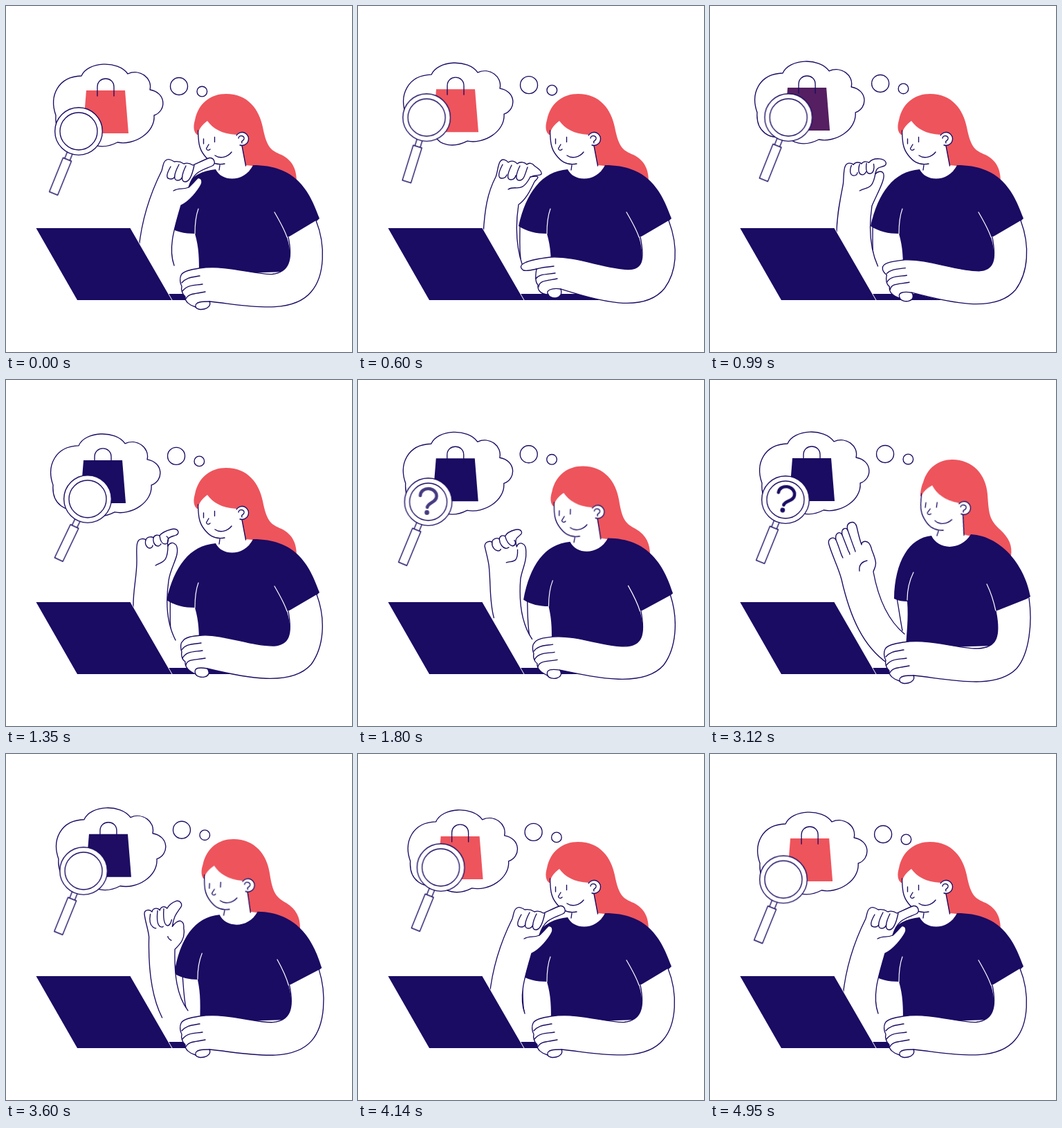
Write an HTML page without scripts that moves like this. It is 500x500 px and loops after 4980 ms.

```html
<!DOCTYPE html>
<html lang="en">
<head>
<meta charset="utf-8">
<title>Thinking about shopping</title>
<style>
:root { --navy: #1a0b63; --red: #ee545c; --loop: 4980ms; }
html, body { margin: 0; width: 100%; height: 100%; overflow: hidden; background: #fff; }
svg { display: block; width: 100vw; height: 100vh; }
.ink { fill: none; stroke: var(--navy); stroke-width: 1.35; stroke-linecap: round; stroke-linejoin: round; }
.skin { fill: #fff; }
.navy { fill: var(--navy); }
.red { fill: var(--red); }
.crease { fill: none; stroke: #fff; stroke-width: 1.2; stroke-linecap: round; }

.lens, .grip, .bag, .mark, .head, .hair, .shirt, .crease, .upper, .reach, .folds, .rest, .knuckles {
  animation: var(--loop) ease-in-out infinite;
}

/* thought cloud */
.lens { animation-name: lens; animation-timing-function: linear; }
@keyframes lens {
  0%, 100% { transform: translate(105px, 181px); }
  6% { transform: translate(101px, 171px); }
  12% { transform: translate(102px, 163px); }
  17% { transform: translate(112px, 161px); }
  22% { transform: translate(121px, 168px); }
  27.1% { transform: translate(122px, 178px); }
  33% { transform: translate(109px, 185px); }
  39% { transform: translate(101px, 184.5px); }
  48.8% { transform: translate(103.5px, 183px); }
  62.7% { transform: translate(106px, 182px); }
  68% { transform: translate(106px, 180px); }
  76% { transform: translate(110px, 171px); }
  83.1% { transform: translate(116px, 167px); }
  91% { transform: translate(114px, 175px); }
  99.4% { transform: translate(106px, 181.3px); }
}
.grip { animation-name: grip; }
@keyframes grip {
  0%, 39%, 68%, 100% { transform: rotate(22deg); }
  12% { transform: rotate(17.3deg); }
  27.1% { transform: rotate(25.5deg); }
}
.bag { animation-name: bag; }
@keyframes bag {
  0%, 18%, 75%, 100% { fill: var(--red); }
  21%, 72% { fill: var(--navy); }
}
.mark { animation-name: mark; }
@keyframes mark {
  0%, 32%, 71%, 100% { transform: scale(0) rotate(-20deg); opacity: 0; }
  38%, 48.8% { transform: rotate(0deg); opacity: 1; }
  62.7%, 66% { transform: rotate(8deg); opacity: 1; }
}

/* head and body */
.head { animation-name: head; transform-origin: 341px 192px; }
@keyframes head {
  0%, 33%, 76.5%, 100% { transform: none; }
  43%, 66% { transform: translate(26px, -7px) rotate(8deg); }
}
.hair { animation-name: hair; }
@keyframes hair {
  0%, 33%, 76.5%, 100% { d: path("M276 186C270 181 271 172 273 165C278 140 296 127 318 127C350 127 366 150 371 175C377 206 384 209 398 215C414 223 420 236 420 254L340 235L330 186Z"); }
  43%, 48.8% { d: path("M304 168C304 163 305 154 308 148C314 127 330 115 350 115C380 115 398 137 400 165C401 197 400 200 414 216C428 230 430 240 430 250L365 228L358 178Z"); }
  62.7%, 66% { d: path("M304 168C304 163 305 154 308 148C314 127 330 115 350 115C380 115 399 137 401 165C403 195 404 202 419 216C433 229 437 240 435 254L365 228L358 178Z"); }
}
.shirt { animation-name: shirt; }
@keyframes shirt {
  0%, 33%, 76.5%, 100% { d: path("M303 236C312 255 345 255 357 230C418 230 438 265 453 307C440 320 425 330 406 334C412 355 413 372 405 384L279 388C279 365 279 350 273 329C258 329 244 326 232 318C243 270 265 239 303 236Z"); }
  43%, 66% { d: path("M320 225C330 246 362 247 377 223C424 226 456 272 463 313C447 324 430 331 413 334C418 355 418 372 410 384L283 388C284 365 287 345 285 320C279 320 272 319 266 316C267 262 288 228 320 225Z"); }
}
.crease { animation-name: crease; }
@keyframes crease {
  0%, 33%, 76.5%, 100% { d: path("M278 293C274 304 273 316 273 329M388 298C395 310 402 322 406 334"); }
  43%, 66% { d: path("M294 278C287 292 285 304 285 318M400 295C406 307 410 320 413 334"); }
}
.upper { animation-name: upper; }
@keyframes upper {
  0%, 10%, 33%, 79%, 100% { d: path("M238 318C238 340 237 357 240 372"); }
  12% { d: path("M234 316C234 335 233 350 235 365"); }
  43%, 66% { d: path("M270 315C273 331 275 347 278 362"); }
}

/* raised arm: forearm, four fingers, thumb */
.reach { animation-name: reach; }
@keyframes reach {
  0%, 79%, 100% { d: path("M192 350C196 310 208 272 225 238C227 232 227 225 231 223C234 220 240 223 243 225C248 224 254 226 257 228C262 226 267 228 270 230C279 226 287 222 294 219.5C301 219 304 228 298 231C285 237 271 238 264 262C270 257 275 250 278 248.5C283 248 284 254 282 258C278 266 265 283 253 288C243 322 234 350 243 375"); }
  12%, 14% { d: path("M181 330C183 294 187 270 199 247C202 240 202 228 206 224C209 220 215 223 217 226C222 222 228 225 230 228C235 224 241 226 244 229C247 226 252 227 255 231C262 236 266 239 265 243C262 246 257 243 249 247C254 246 259 246 260 247C260 250 257 251 255 254C250 264 243 280 232 287C227 320 229 350 238 376"); }
  24%, 33% { d: path("M184 330C183 306 189 285 189 262C189 248 188 240 190 235C192 228 200 229 202 231C204 226 211 226 213 228C215 223 220 224 222 225C226 219 234 217 240 215.5C250 214 251 222 246 224C240 227 231 225 234 240C237 234 242 235 244 237C248 239 248 247 247 252C245 262 237 275 235 290C230 325 234 355 245 376"); }
  44%, 49% { d: path("M256 409C222 385 207 350 190 297C178 287 166 276 150 264C143 258 147 248 154 251C150 242 156 235 162 239C156 231 161 225 167 229C164 225 166 221 169 220C173 217 177 219 180 222C190 231 198 238 207 246C202 241 206 236 212 237C216 238 219 241 222 246C238 265 236 268 234 278C243 315 255 348 283 367"); }
  62%, 66% { d: path("M256 409C222 385 203 345 190 288C186 272 177 255 172 238C169 229 179 225 182 231C180 220 189 218 191 224C189 214 197 212 199 217C197 210 200 207 203 206C208 204 211 208 212 212C214 221 216 230 219 238C219 233 225 232 229 235C232 238 233 242 234 246C243 268 239 268 236 277C243 315 258 348 281 367"); }
}
.folds { animation-name: folds; }
@keyframes folds {
  0%, 79%, 100% { d: path("M238 232C231 244 231 250 238 250C241 250 243 249 244 246M250 229C243 242 241 252 248 252C252 252 254 250 255 246M260 231C254 243 252 254 259 254C266 254 270 240 272 230M242 267C250 262 255 266 264 262"); }
  12%, 14% { d: path("M209 229C202 242 202 249 208 249C212 249 214 247 215 244M222 230C216 242 214 251 221 251C225 251 227 249 228 245M234 231C228 243 227 252 233 252C240 252 241 244 245 233M217 265C228 258 236 272 249 247"); }
  24%, 33% { d: path("M202 231C200 238 204 243 208 243C210 243 212 241 212 239M213 228C212 236 216 240 220 240C222 240 223 238 224 237M222 225C223 234 226 237 230 237C235 237 236 228 232 226M216 268C225 262 234 266 234 238"); }
  44%, 49% { d: path("M154 251C160 256 166 261 171 265C174 267 176 269 179 271M162 239C170 247 177 254 182 259C184 261 187 263 189 265M167 229C177 239 185 247 190 253C192 256 194 258 196 260M206 244C216 256 219 262 214 279"); }
  62%, 66% { d: path("M182 231C185 238 187 244 189 250C190 253 191 255 192 257M191 224C195 234 198 242 200 247C201 249 202 250 202 252M199 217C203 228 206 237 208 242C209 245 210 247 210 248M227 261C218 263 215 268 216 276"); }
}
.sway { animation: sway var(--loop) ease-in-out infinite; }
@keyframes sway {
  0%, 74%, 90%, 100% { transform: none; }
  80%, 84% { transform: translate(-2px, 0); }
}

/* arm resting on the laptop */
.rest { animation-name: rest; }
@keyframes rest {
  0%, 76.5%, 100% { d: path("M448 310C462 345 461 390 441 413C412 448 345 432 294 427C299 438 277 442 274 435C266 433 258 427 259 420C254 416 253 409 254 405C251 400 251 393 253 389C256 383 267 381 279 379C320 373 360 389 385 387.5C408 385 415 368 408 334"); }
  12%, 14% { d: path("M449 310C464 350 460 385 443 408C412 446 345 425 293 409C298 425 277 424 275 417C266 417 259 412 260 403C256 399 256 391 258 380C250 382 243 383 239 382C228 374 243 367 278 363C315 361 355 379 390 380.5C410 381 415 368 408 334"); }
  24%, 33% { d: path("M449 310C462 345 460 385 441 411C412 444 345 430 291 417C300 430 278 433 274 425C266 421 258 416 259 407C254 404 253 397 254 393C252 388 252 380 255 378C259 371 270 370 283 369C315 367 355 385 388 384C409 382 414 368 408 334"); }
  43%, 66% { d: path("M461 315C466 350 462 395 443 417C412 449 345 432 294 427C299 438 277 442 274 435C266 433 258 427 259 420C254 416 253 409 254 405C251 400 251 393 253 389C256 383 267 381 279 379C320 373 360 389 387 388C415 387 420 370 413 334"); }
}
.knuckles { animation-name: knuckles; }
@keyframes knuckles {
  0%, 43%, 100% { d: path("M254 400C261 392 268 392 280 390M255 412C262 403 270 404 284 402M260 423C264 415 274 416 288 413M274 435C272 427 285 427 294 427"); }
  12%, 14% { d: path("M258 380C265 378 273 377 283 376M257 394C262 387 272 388 285 386M261 406C262 396 274 397 288 394M275 417C270 411 280 407 293 409"); }
  24%, 33% { d: path("M254 390C260 381 270 382 282 380M255 402C260 392 270 393 284 391M260 412C262 403 272 405 288 402M274 425C270 415 280 415 291 417"); }
}
</style>
</head>
<body>
<svg viewBox="0 0 500 500" role="img" aria-label="A woman at a laptop thinks about shopping">
  <g>
    <animateMotion dur="4.98s" repeatCount="indefinite" calcMode="linear" path="M0 0A4 5.5 0 0 1 0 -11A4 5.5 0 0 1 0 0"/>
    <path class="ink skin" d="M72 158C62 130 75 102 109 101C118 80 162 78 176 98C193 90 212 104 208 121C232 125 232 152 214 158C216 183 185 202 161 197C140 208 120 202 115 190C90 200 70 185 72 158Z"/>
    <circle class="ink" cx="250" cy="116" r="12.5"/>
    <circle class="ink" cx="283.3" cy="123.5" r="7.3"/>
    <path class="bag red" d="M116 122H172L177 184H111Z"/>
    <path class="ink" d="M132 130V117C132 101 156 101 156 117V130"/>
    <g class="lens">
      <g class="grip ink skin">
        <rect class="skin" x="-4" y="33" width="8" height="12"/>
        <rect class="skin" x="-6.5" y="44" width="13" height="53"/>
      </g>
      <circle class="ink skin" r="34.3"/>
      <circle class="ink" r="27"/>
      <g class="mark">
        <path class="ink" style="stroke-width:4.6" d="M-11.5 -9C-11 -23 12 -22 12 -8C12 1 -1 1 -1.5 8"/>
        <circle class="navy" cx="-2" cy="15.5" r="3.4"/>
      </g>
    </g>
  </g>

  <path class="hair red"/>
  <g class="head">
    <path class="skin" d="M277 186C279 177 284 171 291 166C299 177 312 185 333 186L341 203L346 230L357 231L345 246H312L304 237L309 230C302 230 292 223 286 215C279 206 278 197 277 186Z"/>
    <path class="ink" d="M277.5 180C278 197 279 206 286 215C292 223 300 231 316 228M309 230L308 237M341 202L346.5 231"/>
    <path class="ink skin" d="M333 187A9.5 9.5 0 1 1 338 201"/>
    <path class="ink" d="M336 191C337 186 345 187 344 192C343 196 339 194 341 198"/>
    <path class="ink" d="M285.5 192V199M301.5 189.5V196.500M293 200L289.500 206C290 209 293 209 295 207M302 216C309 221 320 219 326 211"/>
  </g>

  <path class="upper ink"/>
  <path class="shirt navy"/>
  <path class="crease"/>
  <g class="sway">
    <path class="reach ink skin"/>
    <path class="folds ink"/>
  </g>

  <path class="navy" d="M234 416H400V425H238Z"/>
  <path class="navy" d="M43.500 321H180L240 425H103Z"/>
  <path d="M180 321L240 425" fill="none" stroke="#fff"/>

  <path class="rest ink skin"/>
  <path class="knuckles ink"/>
</svg>
</body>
</html>
```
